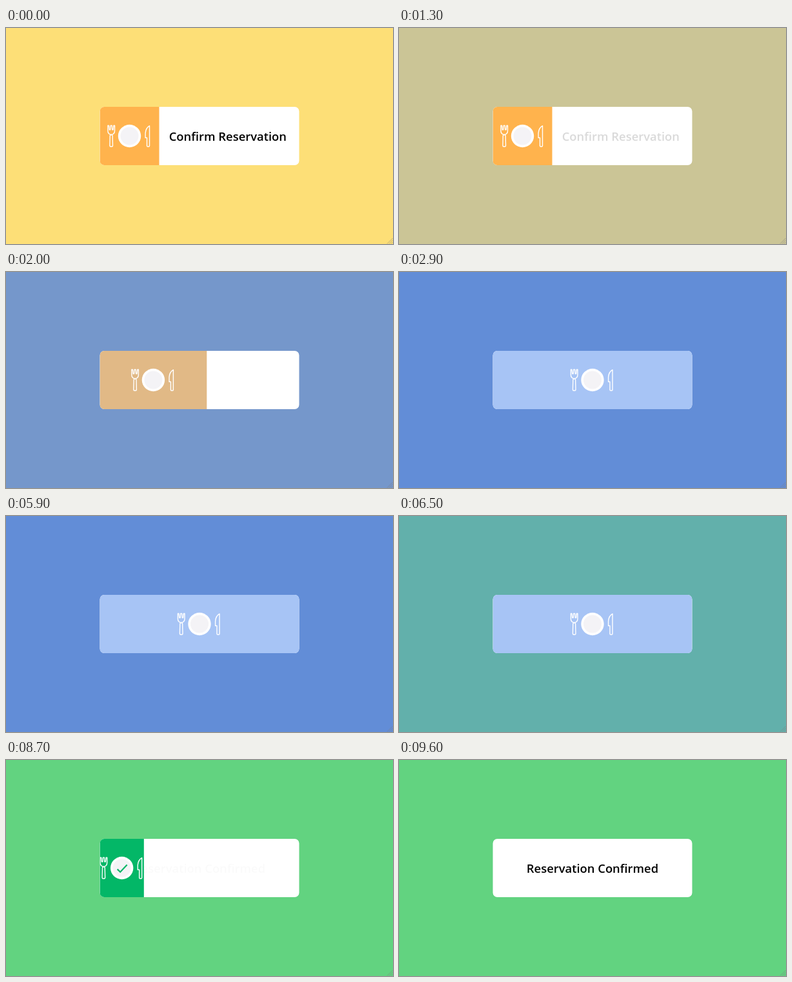
An HTML page with a canvas for the animation above (9700 ms loop, 600 by 337 pixels).

```html
<!DOCTYPE html>
<html lang="en">
<head>
<meta charset="utf-8">
<title>Confirm Reservation</title>
<style>
html, body { margin: 0; height: 100%; overflow: hidden; }
canvas { display: block; width: 600px; height: 337px; }
</style>
</head>
<body>
<canvas></canvas>
<script>
const LOOP = 9700;
const BOX = { x: 145.5, y: 123, w: 309, h: 91, r: 7 };
const PANEL_WIDTH = 92;
const YELLOW = [253, 223, 119], BLUE = [98, 141, 215], GREEN = [98, 211, 128];
const ORANGE = [255, 179, 77], PALE_BLUE = [167, 196, 245], DARK_GREEN = [3, 183, 103];

const fork = new Path2D('M-33.6-16.2h1.6l.8 6.5h1.4l.5-6.5h2l.5 6.5h1.4l.8-6.5h1.6v8' +
  'q0 4.5-3.9 6h-2.8q-3.9-1.5-3.9-6z' +
  'M-29-1.8h1.4q1.2 0 1.2 1.2l.4 15.6q0 1.5-1.5 1.5h-1.6q-1.5 0-1.5-1.5l.4-15.6q0-1.2 1.2-1.2z');
const knife = new Path2D('M31-15.8v31q0 1.3-1.3 1.3h-1.4q-1.3 0-1.3-1.3v-12.4h-2.4v-7.3q.6-8 6.4-11.3z');
const check = new Path2D('M-7 1.9l4.5 4.4L8-4.9');
const CHECK_LENGTH = 22;

const canvas = document.querySelector('canvas');
const ctx = canvas.getContext('2d');
const density = window.devicePixelRatio || 1;
canvas.width = 600 * density;
canvas.height = 337 * density;

const progress = (t, from, to) => Math.min(1, Math.max(0, (t - from) / (to - from)));
const ease = p => p < .5 ? 2 * p * p : 1 - 2 * (1 - p) ** 2;
const tween = (t, from, to) => ease(progress(t, from, to));
const mix = (a, b, p) => a + (b - a) * p;
const blend = (a, b, p) => a.map((v, i) => mix(v, b[i], p));
const rgb = c => `rgb(${c.map(Math.round)})`;

function label(text, x, alpha) {
  ctx.globalAlpha = alpha;
  ctx.fillStyle = '#000';
  ctx.fillText(text, x, 175.5);
  ctx.globalAlpha = 1;
}

function disc(radius, color) {
  ctx.fillStyle = color;
  ctx.beginPath();
  ctx.arc(0, 0, radius, 0, 7);
  ctx.fill();
}

function icons(x, checked) {
  ctx.save();
  ctx.translate(x, 168.5);
  ctx.strokeStyle = '#fff';
  ctx.lineWidth = 1.4;
  ctx.lineJoin = 'round';
  ctx.stroke(fork);
  ctx.stroke(knife);
  disc(17.7, '#fff');
  disc(14, '#f4f3f6');
  if (checked > 0) {
    ctx.strokeStyle = rgb(DARK_GREEN);
    ctx.lineWidth = 2.2;
    ctx.lineJoin = 'miter';
    ctx.setLineDash([CHECK_LENGTH * checked, CHECK_LENGTH * 2]);
    ctx.stroke(check);
  }
  ctx.restore();
}

function resizeGrip() {
  ctx.strokeStyle = 'rgba(125,125,125,.5)';
  ctx.lineWidth = 1;
  ctx.beginPath();
  for (const d of [3, 6, 9]) {
    ctx.moveTo(600 - d, 336.5);
    ctx.lineTo(599.5, 337 - d);
  }
  ctx.stroke();
}

function draw(t) {
  ctx.setTransform(density, 0, 0, density, 0, 0);
  ctx.font = '600 18.4px "Open Sans", sans-serif';
  ctx.textAlign = 'center';

  const toBlue = blend(YELLOW, BLUE, tween(t, 500, 2500));
  ctx.fillStyle = rgb(blend(toBlue, GREEN, tween(t, 6000, 7000)));
  ctx.fillRect(0, 0, 600, 337);
  resizeGrip();

  ctx.save();
  ctx.beginPath();
  ctx.roundRect(BOX.x, BOX.y, BOX.w, BOX.h, BOX.r);
  ctx.fillStyle = '#fff';
  ctx.fill();
  ctx.clip();

  label('Confirm Reservation', 343.8, 1 - tween(t, 500, 1600));
  label('Reservation Confirmed', 300, tween(t, 8600, 9600));

  const grow = tween(t, 1370, 2900);
  const width = mix(PANEL_WIDTH, BOX.w, grow) * (1 - tween(t, 7900, 9100));
  if (width > 0) {
    ctx.beginPath();
    ctx.rect(BOX.x, BOX.y, width, BOX.h);
    const panel = blend(ORANGE, PALE_BLUE, grow);
    ctx.fillStyle = rgb(blend(panel, DARK_GREEN, tween(t, 6500, 7500)));
    ctx.fill();
    ctx.clip();
    icons(BOX.x + width / 2, tween(t, 7000, 7550));
  }
  ctx.restore();
}

function frame() {
  draw(performance.now() % LOOP);
  requestAnimationFrame(frame);
}
frame();
</script>
</body>
</html>
```
